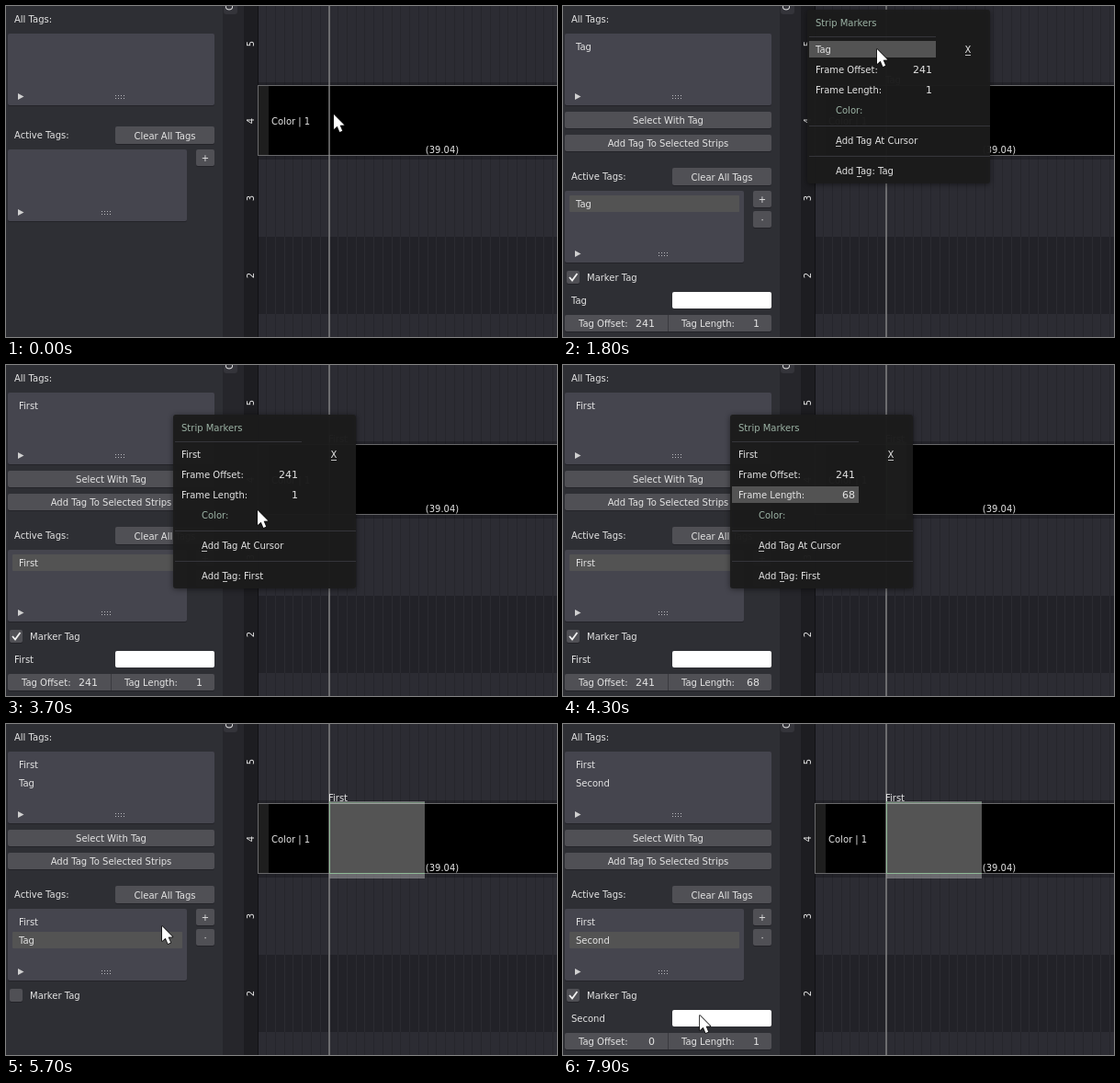
An HTML page with a canvas that plays this animation: 600 px wide and 360 px high, repeating every 8000 ms.

```html
<!DOCTYPE html>
<html lang="en">
<head>
<meta charset="utf-8">
<title>Strip tags</title>
<style>
  html, body { margin: 0; width: 100%; height: 100%; overflow: hidden; background: #2e2f34; }
  canvas { display: block; width: 600px; height: 360px; }
</style>
</head>
<body>
<canvas id="stage" width="600" height="360"></canvas>
<script>
const g = document.getElementById('stage').getContext('2d');
const LOOP = 8000, STEP = 100;
const FONT = '"DejaVu Sans", sans-serif';
const INK = '#e4e4e4', BUTTON = '#505055', LIST = '#45454e', HOVER = '#535353';

// Step tables: [start time, value]
const FIRST = [[0, ''], [1100, 'Tag'], [3000, 'First']];
const SECOND = [[0, ''], [5500, 'Tag'], [7000, 'Second']];
const LENGTH = [[0, 1], [4200, 30], [4300, 68], [4400, 130], [4500, 195], [4600, 250], [4700, 300], [4800, 320]];
const EDIT_FIRST = [[0, null], [2000, 'Tag'], [2200, ''], [2500, 'F'], [2600, 'Fi'], [2800, 'Firs'], [2900, 'First'], [3000, null]];
const EDIT_SECOND = [[0, null], [6100, 'Tag'], [6400, ''], [6500, 'S'], [6600, 'Se'], [6700, 'Sec'], [6800, 'Seco'], [6900, 'Second'], [7000, null]];
const POPUP = [[0, null], [700, [267, 103]], [1100, [267, 4]], [3100, null], [3700, [183, 54]], [4900, null]];
const POINTER = [[0, 'arrow'], [2000, 'beam'], [3000, 'arrow'], [4100, 'none'], [4800, 'arrow'], [6100, 'beam'], [7000, 'arrow']];

// Pointer path: [time, x, y]
const PATH = [
  [0, 357, 118], [600, 357, 118], [1000, 356, 138], [1300, 355, 138], [1400, 355, 138], [1500, 350, 100],
  [1600, 350, 100], [1800, 342, 47], [3200, 342, 47], [3600, 274, 158], [3700, 274, 158], [4000, 269, 137],
  [5000, 269, 137], [5400, 215, 209], [5500, 215, 209], [5900, 125, 231], [6000, 117, 229],
  [7100, 117, 229], [7400, 10, 293], [7600, 10, 293], [7900, 149, 317], [8000, 149, 317]
];

const at = (table, t) => table.reduce((v, row) => row[0] <= t ? row[1] : v, table[0][1]);

function pointerAt(t) {
  const i = Math.max(1, PATH.findIndex(p => p[0] > t));
  const [t0, x0, y0] = PATH[i - 1], [t1, x1, y1] = PATH[i];
  const k = (t - t0) / (t1 - t0), e = k * k * (3 - 2 * k);
  return [Math.round(x0 + (x1 - x0) * e), Math.round(y0 + (y1 - y0) * e)];
}

function rect(x, y, x2, y2, color) {
  g.fillStyle = color;
  g.fillRect(x, y, x2 - x, y2 - y);
}

function box(x, y, x2, y2, color, r = 2) {
  g.fillStyle = color;
  g.beginPath();
  g.roundRect(x, y, x2 - x, y2 - y, r);
  g.fill();
}

function raised(x, y, x2, y2, color) {
  box(x, y + 1, x2, y2 + 1, '#232328');
  box(x, y, x2, y2, color);
}

function text(s, x, y, { align = 'left', color = INK, size = 10 } = {}) {
  g.font = `${size}px ${FONT}`;
  g.textAlign = align;
  g.fillStyle = color;
  g.fillText(s, x, y + 4);
}

const value = (s, x, y) => text(s, x, y, { align: 'right', size: 11 });

function sideways(s, x, y, align) {
  g.save();
  g.translate(x, y);
  g.rotate(-Math.PI / 2);
  text(s, 0, 0, { align });
  g.restore();
}

function button(label, x, y, x2, y2) {
  raised(x, y, x2, y2, BUTTON);
  text(label, (x + x2) / 2, (y + y2 - 1) / 2 + .5, { align: 'center' });
}

function list(x2, y) {
  raised(2, y, x2, y + 78, LIST);
  g.fillStyle = '#d0d0d0';
  g.beginPath();
  g.moveTo(13, y + 65);
  g.lineTo(19.5, y + 68.5);
  g.lineTo(13, y + 72);
  g.fill();
  const grip = Math.round((x2 + 2) / 2) + 4;
  for (let i = 0; i < 8; i++) {
    const gx = grip + (i % 4) * 3, gy = y + (i < 4 ? 67 : 70);
    rect(gx, gy, gx + 1, gy + 1, '#b8b8bc');
  }
}

function field(s, original, x, y) {
  const w = (g.font = `10px ${FONT}`, g.measureText(s).width);
  if (s === original) rect(x, y - 8, x + w, y + 8, '#4772a0');
  text(s, x, y);
  rect(x + w - .5, y - 8, x + w + 1.5, y + 8, '#3f8fd2');
}

function timeline(first, length) {
  rect(236, 0, 259, 360, '#26262b');
  rect(259, 0, 275, 360, '#1d1d21');
  box(237, -8, 252, 9, '#34343a', 3);
  sideways('C', 243, 5, 'left');
  rect(275, 0, 600, 360, '#2c2c33');
  rect(275, 83, 600, 167, '#222228');
  rect(275, 251, 600, 335, '#222228');
  for (let x = 283; x < 600; x += 9.75) {
    const px = Math.round(x);
    rect(px, 0, px + 1, 360, 'rgba(20,20,25,.22)');
    rect(px, 251, px + 1, 335, 'rgba(60,60,68,.45)');
  }
  rect(274, 0, 275, 360, '#111114');
  [5, 4, 3, 2].forEach((n, i) => sideways(n, 266, 41 + 84 * i, 'center'));

  rect(275, 86, 600, 163, '#000');
  rect(275, 86, 286, 163, '#1e1e1e');
  rect(275, 86, 600, 87, '#68686a');
  rect(275, 162, 600, 163, '#68686a');
  rect(274, 86, 275, 163, '#68686a');
  text('Color | 1', 289, 125);
  text('(39.04)', 475, 156, { align: 'center' });

  if (first) {
    const end = 352 + length * 104 / 320;
    rect(352, 84, end, 168, 'rgba(255,255,255,.33)');
    if (length > 1) {
      rect(352, 85, end, 86, '#6f8a74');
      rect(352, 162, end, 163, '#8fb896');
    }
  }
  rect(351, 0, 353, 360, 'rgba(150,150,150,.62)');
  if (first && length > 1) rect(352, 84, 353, 163, '#8fb896');
  if (first) text(first, 351, 80);
}

function panel(t, first, second, length) {
  const edit = at(EDIT_SECOND, t);
  const y = first ? 201 : 156;
  rect(0, 0, 236, 360, '#2e2f34');
  text('All Tags:', 9, 14);
  list(227, 30);
  text(first, 14, 44);
  text(second, 14, 64);
  if (first) {
    button('Select With Tag', 2, 115, 227, 133);
    button('Add Tag To Selected Strips', 2, 140, 227, 158);
  }
  text('Active Tags:', 9, y - 16);
  button('Clear All Tags', 119, y - 25, 227, y - 6);
  list(197, y);
  button('+', 207, y, 227, y + 18);
  if (!first) return;

  button('·', 207, 223, 227, 241);
  const row = second ? 235 : 215;
  box(7, row - 9, 192, row + 9, HOVER, 1);
  text(first, 14, 215);
  if (edit === null) text(second, 14, 235);
  else field(edit, second, 14, 235);

  const marked = !second || t >= 7600;
  raised(4, 288, 18, 302, BUTTON);
  text('Marker Tag', 26, 295);
  if (!marked) return;

  g.strokeStyle = '#f0f0f0';
  g.lineWidth = 1.8;
  g.beginPath();
  g.moveTo(7, 295);
  g.lineTo(10, 298.5);
  g.lineTo(15.5, 291);
  g.stroke();
  text(second || first, 9, 320);
  box(119, 311, 227, 329, '#fff');
  raised(2, 336, 227, 354, BUTTON);
  rect(114, 336, 115, 354, '#3a3a3f');
  text('Tag Offset:', 17, 345);
  value(second ? 0 : 241, 100, 345);
  text('Tag Length:', 129, 345);
  value(second ? 1 : length, 214, 345);
}

function popup(t, [x, y], first, length, [px, py], pointer) {
  const edit = at(EDIT_FIRST, t);
  const bottom = first ? 189 : 57, add = first ? 142 : 43;
  const soft = { color: '#9cb3a5' };
  const line = (dy, w) => rect(x + 1, y + dy, x + w, y + dy + 1, '#35353a');
  const under = (dx, dy, w) => rect(x + dx, y + dy + 6, x + dx + w, y + dy + 7, '#c0c0c0');

  g.save();
  g.shadowColor = 'rgba(0,0,0,.5)';
  g.shadowBlur = 6;
  g.shadowOffsetY = 1;
  box(x - 1, y, x + 198, y + bottom, 'rgba(28,28,28,.95)', 3);
  g.restore();

  const rows = first ? [43, 65, 87, 142, 175] : [43];
  const focus = edit !== null ? 43 : pointer === 'none' ? 87
    : px > x && px < x + 198 && rows.find(r => Math.abs(py - y - r) <= 10);
  if (focus) {
    const wide = focus >= 142 || !first;
    rect(x + 1, y + focus - 9, x + (wide ? 197 : 139), y + focus + 9, HOVER);
  }

  text('Strip Markers', x + 8, y + 14, soft);
  line(29, first ? 139 : 198);
  if (first) {
    if (edit === null) text(first, x + 8, y + 43);
    else field(edit, first, x + 8, y + 43);
    text('X', x + 174, y + 43, { align: 'center' });
    under(171, 43, 6);
    text('Frame Offset:', x + 8, y + 65);
    value(241, x + 135, y + 65);
    text('Frame Length:', x + 8, y + 87);
    value(length, x + 135, y + 87);
    text('Color:', x + 30, y + 109, soft);
    line(126, 198);
    line(159, 198);
    text('Add Tag: ' + first, x + 30, y + 175);
    under(53, 175, 5);
  }
  text('Add Tag At Cursor', x + 30, y + add);
  under(30, add, 6);
}

function drawPointer(kind, [x, y]) {
  if (kind === 'none') return;
  g.save();
  g.translate(x, y);
  if (kind === 'arrow') {
    g.beginPath();
    [[0, 0], [0, 16], [3.7, 12.8], [6.4, 19], [9.2, 17.8], [6.6, 11.8], [11.4, 11.6]]
      .forEach(p => g.lineTo(...p));
    g.closePath();
    g.lineJoin = 'round';
    g.lineWidth = 1.6;
    g.strokeStyle = '#111';
    g.stroke();
    g.fillStyle = '#fff';
    g.fill();
  } else {
    const bars = [[-3, 0, 3, 2], [-1, 0, 1, 14], [-3, 12, 3, 14]];
    bars.forEach(([a, b, c, d]) => rect(a - 1, b - 1, c + 1, d + 1, '#111'));
    bars.forEach(([a, b, c, d]) => rect(a, b, c, d, '#fff'));
  }
  g.restore();
}

function draw(t) {
  const first = at(FIRST, t), second = at(SECOND, t), length = at(LENGTH, t);
  const spot = pointerAt(t), pointer = at(POINTER, t), origin = at(POPUP, t);
  timeline(first, length);
  panel(t, first, second, length);
  if (origin) popup(t, origin, first, length, spot, pointer);
  drawPointer(pointer, spot);
}

function tick() {
  const t = performance.now() % LOOP;
  draw(Math.floor(t / STEP) * STEP);
  requestAnimationFrame(tick);
}
tick();
</script>
</body>
</html>
```
